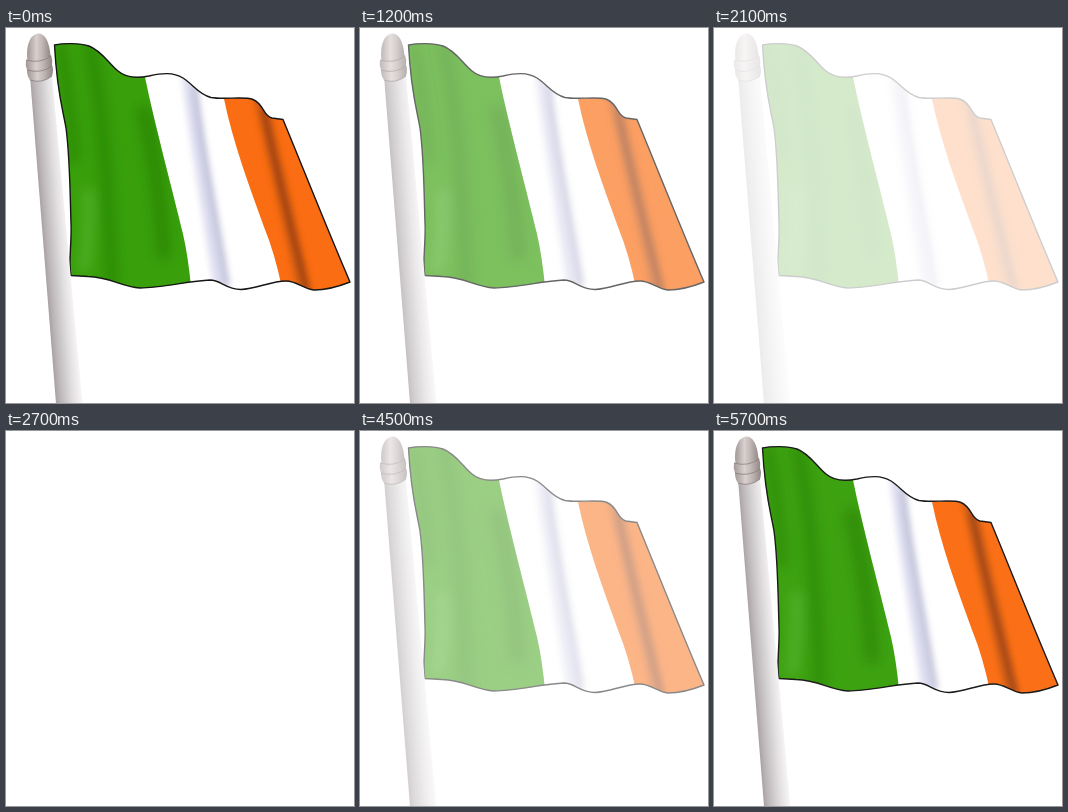
Animation of 348 by 375 pixels, one loop 6 s. Source, as an HTML page:

```html
<!DOCTYPE html>
<html lang="en">
<head>
<meta charset="utf-8">
<title>Flag</title>
<style>
  html, body { margin: 0; width: 100%; height: 100%; overflow: hidden; background: #fff; }
  svg { display: block; width: 348px; height: 375px; }
  .fold { fill: none; stroke-linecap: round; }
</style>
</head>
<body>
<svg id="scene" viewBox="0 0 348 375">
  <defs>
    <path id="cloth" d="M48.5 17C58 15 74 15 83 18C96 23 103 36 112 43C120 50 133 50 143 48C156 45 167 44 177 50C188 57 192 66 205 69.5C218 72 238 68 247 71.5C258 76 257 88 266 90L277 91.5C297 140 322 203 344 254C334 258 320 262 308 262C297 261 291 253 280 253C265 253 250 261 235 261.5C219 261 215 252 204 252C182 253 156 260 134 260C115 259 105 249 82 248.5L65 247.5C62 235 66 215 65 195C64 165 64 130 60 100C57 82 51 65 48.5 17Z"/>
    <clipPath id="flag"><use href="#cloth"/></clipPath>
    <clipPath id="green"><path d="M40 0H139V49C149 98 166 160 177 206Q183 232 186 270H40Z"/></clipPath>
    <clipPath id="orange"><path d="M218 60V71C227 115 244 160 258 199Q270 228 278 270H348V60Z"/></clipPath>
    <filter id="soft" x="-80%" y="-30%" width="260%" height="160%"><feGaussianBlur stdDeviation="6"/></filter>
    <filter id="fine" x="-80%" y="-30%" width="260%" height="160%"><feGaussianBlur stdDeviation="3"/></filter>
    <linearGradient id="pole">
      <stop offset="0" stop-color="#a8a0a0"/>
      <stop offset=".15" stop-color="#b9b3b5"/>
      <stop offset=".4" stop-color="#cecacc"/>
      <stop offset=".65" stop-color="#e2dfe1"/>
      <stop offset="1" stop-color="#f8f6f6"/>
    </linearGradient>
    <linearGradient id="knob">
      <stop offset="0" stop-color="#a09695"/>
      <stop offset=".4" stop-color="#d8d0ce"/>
      <stop offset=".65" stop-color="#c0b6b4"/>
      <stop offset="1" stop-color="#918685"/>
    </linearGradient>
  </defs>

  <g clip-path="url(#flag)">
    <rect width="348" height="375" fill="#fff"/>

    <g class="fold" filter="url(#fine)">
      <path d="M183 50C189 105 200 165 214 256" stroke="#dcdcef" stroke-width="13"/>
      <path d="M189 60C194 110 207 170 221 256" stroke="#a4a4c6" stroke-width="5" opacity=".75"/>
    </g>

    <g clip-path="url(#green)">
      <rect width="348" height="375" fill="#39a00b"/>
      <g class="fold" filter="url(#soft)">
        <path d="M54 20C60 50 66 90 68 130" stroke="#2b8407" stroke-width="13" opacity=".6"/>
        <path d="M84 20C96 75 102 150 106 255" stroke="#2b8407" stroke-width="15" opacity=".6"/>
        <path d="M138 85C146 120 154 170 158 225" stroke="#297f06" stroke-width="16" opacity=".6"/>
        <path d="M82 165C83 190 82 215 78 240" stroke="#62bd42" stroke-width="7" opacity=".75"/>
      </g>
    </g>

    <g clip-path="url(#orange)">
      <rect width="348" height="375" fill="#fb6d12"/>
      <g class="fold" filter="url(#fine)">
        <path d="M254 66C264 115 280 177 298 260" stroke="#b04c12" stroke-width="13" opacity=".65"/>
        <path d="M258 82C267 130 283 190 301 262" stroke="#6e2c0a" stroke-width="4" opacity=".7"/>
      </g>
    </g>
  </g>
  <use href="#cloth" fill="none" stroke="#161616" stroke-width="1.4" stroke-linejoin="round"/>

  <path fill="url(#pole)" d="M24 48H46L50 375H23.5Z" transform="matrix(1 0 .081 1 -3.9 0)"/>
  <g fill="url(#knob)">
    <path d="M21.5 32C20 22 22 7 32 5.5C40 5 44 17 44.5 29Q35 38 21.5 32Z"/>
    <path d="M20 32Q33 34 45 27Q47 32 46 38Q35 46 21 42Q19 37 20 32Z"/>
    <path d="M21 42Q35 44 46 37Q48 42 46 48Q36 56 24 52Q21 48 21 42Z"/>
  </g>
  <g fill="none" stroke="#7a6f6d" opacity=".65">
    <path d="M20 32Q34 36 45 28"/>
    <path d="M21 42Q35 46 46 38"/>
    <path d="M24 52Q36 56 46 48"/>
  </g>
</svg>
<script>
  const LOOP = 6000, STEP = 300;
  const scene = document.getElementById('scene');

  // Cosine fade in steps; the faintest steps are blank.
  function draw() {
    const t = Math.floor(performance.now() % LOOP / STEP) * STEP;
    const level = (1 + Math.cos(2 * Math.PI * t / LOOP)) / 2;
    scene.style.opacity = level < 0.05 ? 0 : level;
    requestAnimationFrame(draw);
  }
  draw();
</script>
</body>
</html>
```
